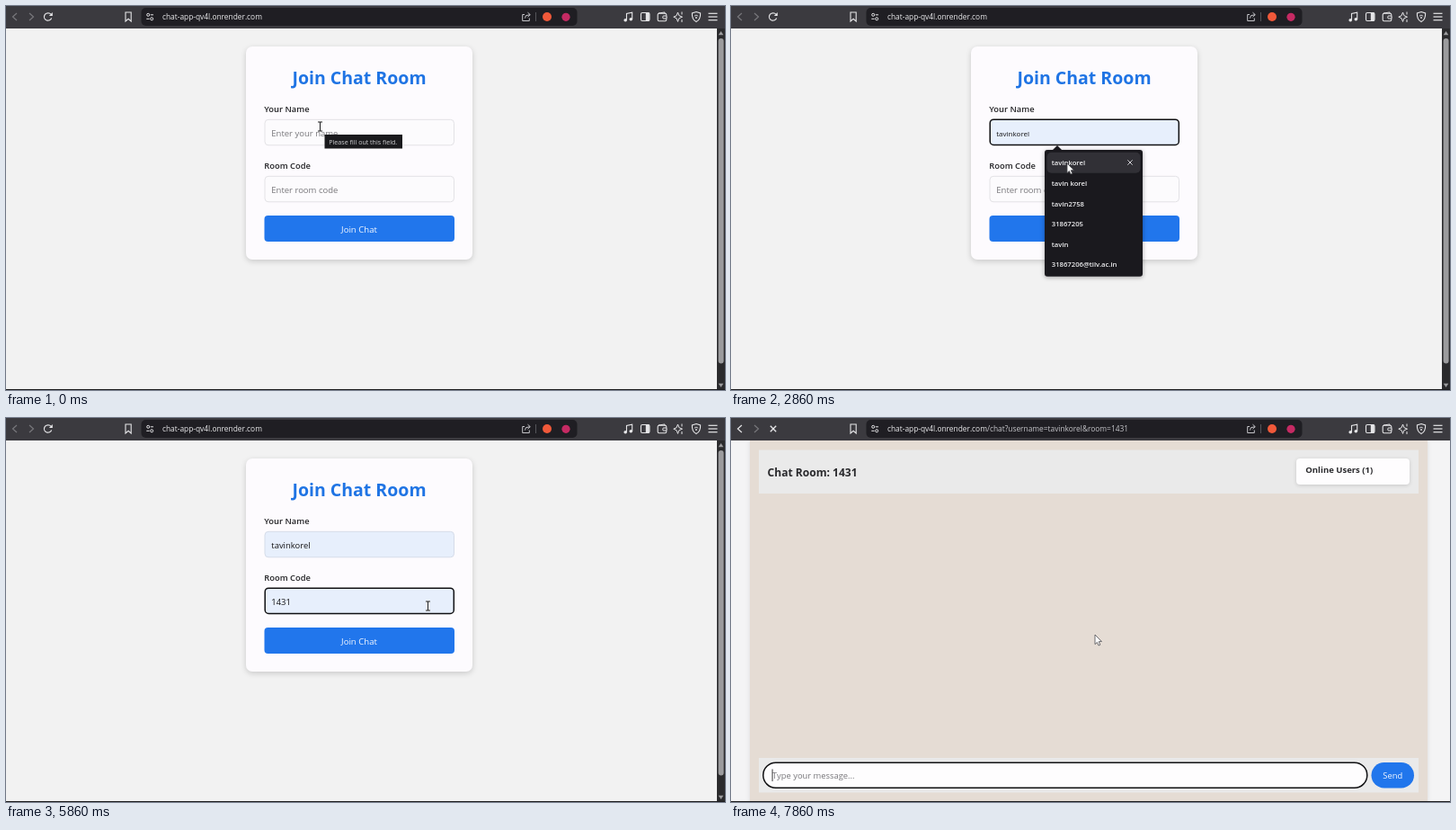
Write an HTML page with a canvas that moves like this. It is 800 px wide and 427 px high and loops after 8000 ms.

```html
<!DOCTYPE html>
<html lang="en">
<head>
<meta charset="utf-8">
<title>Join Chat Room</title>
<style>
html, body { margin: 0; width: 100%; height: 100%; overflow: hidden; background: #f2f2f2; }
canvas { display: block; width: 800px; height: 427px; }
</style>
</head>
<body>
<canvas id="stage"></canvas>
<script>
const canvas = document.getElementById('stage');
const dpr = window.devicePixelRatio || 1;
canvas.width = 800 * dpr;
canvas.height = 427 * dpr;
const ctx = canvas.getContext('2d');

const LOOP = 8000, STEP = 1000 / 7;
const FONT = '"Open Sans", "Noto Sans", sans-serif';
const BLUE = '#2176ec', BLUE_HOVER = '#1f6ede', AUTOFILL = '#e7effc';
const USER = 'tavinkorel', ROOM = '1431';
const NAMES = [USER, 'tavin korel', 'tavin2758', '31867205', 'tavin', '31867206@tilv.ac.in'];
const CODES = [ROOM, '121'];
const FIELD = { x: 287.5, w: 211.5, h: 29.5 };
const NAME_Y = 126, ROOM_Y = 189, BUTTON_Y = 233;

// Steps at which the state of the page changes
const AT = {
  nameFocus: 2, nameMenu: 3, nameHover: 19, nameFill: 21,
  roomFocus: 28, roomMenu: 29, roomHover: 33, roomFill: 35,
  submit: 48, loading: 49, navigate: 52, chat: 55
};

// Pointer path: step, x, y
const PATH = [
  [0, 349.5, 134], [2, 363.5, 151], [17, 363.5, 153], [19, 374, 175], [21, 374, 175],
  [24, 357, 167], [27, 360, 204], [29, 360, 206], [32, 374, 229], [33, 376, 235],
  [35, 376, 235], [40, 466, 208], [41, 469.5, 209], [43, 466, 212], [47, 405, 241], [56, 405, 241]
];

function pointerAt(k) {
  const i = Math.max(1, PATH.findIndex(p => p[0] >= k));
  const [k0, x0, y0] = PATH[i - 1], [k1, x1, y1] = PATH[i];
  const f = (k - k0) / (k1 - k0);
  return { x: x0 + (x1 - x0) * f, y: y0 + (y1 - y0) * f };
}

const caretOn = (k, from) => Math.floor((k - from) * STEP / 530) % 2 === 0;
const within = (v, a, b) => v >= a && v < b;

function box(x, y, w, h, r, fill, stroke, lw = 1) {
  ctx.beginPath();
  ctx.roundRect(x, y, w, h, r);
  if (fill) { ctx.fillStyle = fill; ctx.fill(); }
  if (stroke) { ctx.strokeStyle = stroke; ctx.lineWidth = lw; ctx.stroke(); }
}

function shadowed(blur, dy, alpha, draw) {
  ctx.save();
  ctx.shadowColor = `rgba(0,0,0,${alpha})`;
  ctx.shadowBlur = blur * dpr;
  ctx.shadowOffsetY = dy * dpr;
  draw();
  ctx.restore();
}

function text(str, x, y, size, color, weight = 400, align = 'left') {
  ctx.font = `${weight} ${size}px ${FONT}`;
  ctx.textAlign = align;
  ctx.fillStyle = color;
  ctx.fillText(str, x, y);
  return ctx.measureText(str).width;
}

function line(points, color, lw = 1, close = false) {
  ctx.beginPath();
  for (let i = 0; i < points.length; i += 2) ctx.lineTo(points[i], points[i + 1]);
  if (close) ctx.closePath();
  ctx.strokeStyle = color;
  ctx.lineWidth = lw;
  ctx.stroke();
}

function poly(points, fill) {
  ctx.beginPath();
  for (let i = 0; i < points.length; i += 2) ctx.lineTo(points[i], points[i + 1]);
  ctx.closePath();
  ctx.fillStyle = fill;
  ctx.fill();
}

function ring(x, y, r, color, lw = 1, from = 0, to = Math.PI * 2) {
  ctx.beginPath();
  ctx.arc(x, y, r, from, to);
  ctx.strokeStyle = color;
  ctx.lineWidth = lw;
  ctx.stroke();
}

function disc(x, y, r, color) {
  ctx.beginPath();
  ctx.arc(x, y, r, 0, Math.PI * 2);
  ctx.fillStyle = color;
  ctx.fill();
}

function cross(x, y, r, color, lw) {
  line([x - r, y - r, x + r, y + r], color, lw);
  line([x + r, y - r, x - r, y + r], color, lw);
}

function toolbar(k) {
  const ink = '#e6e6e8', dim = '#77777b';
  ctx.fillStyle = '#3b3a3f';
  ctx.fillRect(0, 0, 800, 25);
  box(150.5, 2, 485, 20, 5, '#1f1e23');

  line([12, 8, 7.5, 12, 12, 16], k >= AT.navigate ? ink : dim, 1.2);
  line([26, 8, 30.5, 12, 26, 16], dim, 1.2);
  if (k >= AT.loading) cross(47, 12, 3.2, ink, 1.3);
  else {
    ring(46.7, 12, 4.2, ink, 1.2, 0.35, 5.5);
    poly([51.8, 7, 51.8, 11, 47.8, 11], ink);
  }
  line([133, 7, 139.2, 7, 139.2, 17, 136.1, 14.3, 133, 17], ink, 1.1, true);

  ring(158.2, 9.8, 1.5, ink, 1);
  line([160.8, 9.8, 164, 9.8], ink);
  ring(162.2, 14.3, 1.5, ink, 1);
  line([156.3, 14.3, 159.6, 14.3], ink);

  const host = 'chat-app-qv4l.onrender.com';
  const w = text(host, 174, 15, 8.37, '#ececee');
  if (k >= AT.navigate) text(`/chat?username=${USER}&room=${ROOM}`, 174 + w, 15, 8.37, '#c6c6ca');

  line([577, 9.5, 574.7, 9.5, 574.7, 16.5, 582.3, 16.5, 582.3, 13.5], '#c4c4c8');
  line([577.5, 13.5, 578.5, 10.7, 583, 9.7], '#c4c4c8');
  line([580.5, 7.2, 583.3, 9.7, 580.5, 12.2], '#c4c4c8');
  line([589.5, 7, 589.5, 17], '#55555a');
  disc(602, 12, 5, '#f0593a');
  disc(623, 12.3, 4.6, '#c52a63');

  // Music note, side panel, wallet
  disc(689.2, 15.7, 1.8, ink);
  disc(695.3, 14.7, 1.8, ink);
  line([690.5, 15.7, 690.5, 8.4, 696.7, 7.2, 696.7, 14.7], ink, 1.1);
  box(706.5, 7.5, 9.5, 9, 1.5, null, ink, 1.1);
  ctx.fillStyle = ink;
  ctx.fillRect(711.8, 7.5, 4, 9);
  box(725.2, 8.3, 9.6, 8.4, 1.5, null, ink, 1.1);
  line([726, 8, 733, 7, 733, 8.5], ink);
  box(730.8, 11, 4.2, 3, 1, '#3b3a3f', ink);

  // Sparkle
  line([747.5, 7, 748.9, 10.7, 752.5, 12.2, 748.9, 13.7, 747.5, 17.4, 746.1, 13.7, 742.8, 12.2, 746.1, 10.7], ink, 1, true);
  line([752, 6.5, 752, 9.5], ink);
  line([752, 15, 752, 18], ink);

  // Shield
  ctx.beginPath();
  ctx.moveTo(768, 6.5);
  ctx.lineTo(772.6, 8);
  ctx.quadraticCurveTo(773, 15, 768, 17.6);
  ctx.quadraticCurveTo(763, 15, 763.4, 8);
  ctx.closePath();
  ctx.strokeStyle = ink;
  ctx.lineWidth = 1.1;
  ctx.stroke();
  ring(768, 13, 2.7, ink, 0.9, 3.9, 5.5);
  disc(768, 13, 0.9, ink);
  for (const y of [8.3, 12, 15.7]) line([781.5, y, 791.5, y], ink, 1.2);
}

function scrollbar() {
  ctx.fillStyle = '#2b2b2d';
  ctx.fillRect(791, 25, 9, 402);
  box(792.6, 36, 6, 361.5, 3, '#9c9c9e');
  poly([795.5, 28, 798.3, 32.3, 792.7, 32.3], '#9c9c9e');
  poly([795.5, 424, 798.3, 419.8, 792.7, 419.8], '#9c9c9e');
}

function field(y, { value, hint, focus, filled, preview, caret }) {
  const { x, w, h } = FIELD;
  const bg = filled ? AUTOFILL : '#fcfbfd';
  if (focus) box(x + 0.7, y + 0.2, w - 1.4, h - 1.2, 4, bg, '#101012', 1.5);
  else box(x + 0.5, y + 0.3, w - 1, h - 1, 4, bg, filled ? '#d5dce9' : '#e3e2e6');
  const base = y + 19;
  let tw = 0;
  if (value) tw = text(value, 295.3, preview ? base - 0.4 : base, preview ? 8 : 9.45, '#161618');
  else text(hint, 295.3, base, 9.5, '#77767a');
  if (caret) {
    ctx.fillStyle = '#222';
    ctx.fillRect(295.3 + tw, y + 8.5, 0.8, 13);
  }
}

function menu(y, w, items, hover) {
  const h = items.length * 22.65 + 4.9, bg = '#1a191e';
  shadowed(5, 1, 0.35, () => box(349, y, w, h, 3, bg));
  poly([357.5, y + 0.5, 363, y - 5, 368.5, y + 0.5], bg);
  if (hover) {
    box(351.5, y + 2.7, w - 5, 23, 5, '#313036');
    cross(349 + w - 14, y + 14, 2.7, '#cfcfd3', 1);
  }
  items.forEach((s, i) => text(s, 356.8, y + 17.2 + i * 22.65, 7.7, '#f0f0f2', 600));
}

function joinPage(k, p) {
  const nameMenu = within(k, AT.nameMenu, AT.nameFill);
  const roomMenu = within(k, AT.roomMenu, AT.roomFill);
  const nameFocus = within(k, AT.nameFocus, AT.roomFocus);
  const roomFocus = within(k, AT.roomFocus, AT.submit);

  ctx.fillStyle = '#f2f2f2';
  ctx.fillRect(0, 25, 800, 402);
  scrollbar();
  shadowed(6, 2, 0.17, () => box(267, 45, 252, 237, 7, '#fdfbfe'));
  text('Join Chat Room', 393, 87.2, 19.5, '#1f74e4', 700, 'center');
  text('Your Name', 287.3, 118.2, 9.35, '#222225', 600);
  text('Room Code', 287.3, 181.2, 9.35, '#222225', 600);

  field(NAME_Y, {
    value: k >= AT.nameHover ? USER : '',
    hint: 'Enter your name',
    focus: nameFocus,
    filled: k >= AT.nameHover,
    preview: within(k, AT.nameHover, AT.nameFill),
    caret: nameFocus && !within(k, AT.nameHover, AT.nameFill) &&
      caretOn(k, k >= AT.nameFill ? AT.nameFill : AT.nameFocus)
  });
  field(ROOM_Y, {
    value: k >= AT.roomHover ? ROOM : '',
    hint: 'Enter room code',
    focus: roomFocus,
    filled: k >= AT.roomHover,
    preview: within(k, AT.roomHover, AT.roomFill),
    caret: roomFocus && !within(k, AT.roomHover, AT.roomFill) &&
      caretOn(k, k >= AT.roomFill ? AT.roomFill : AT.roomFocus)
  });

  const onButton = !roomMenu && within(p.y, BUTTON_Y, BUTTON_Y + 29);
  box(FIELD.x, BUTTON_Y, FIELD.w, 29, 4, onButton ? BLUE_HOVER : BLUE);
  text('Join Chat', 393, 251.5, 9.6, '#f4f8ff', 400, 'center');

  if (nameMenu) menu(160, 109, NAMES, k >= AT.nameHover);
  if (roomMenu) menu(223, 99, CODES, k >= AT.roomHover);
  if (k < AT.nameFocus) {
    box(354.5, 143, 86.5, 15.5, 0, '#1a1a1d');
    text('Please fill out this field.', 359.3, 153.6, 7.1, '#d2d2d4');
  }

  const overField = within(p.y, NAME_Y, 156) || (within(p.y, ROOM_Y, 219) && !nameMenu);
  return overField && p.x > FIELD.x && p.x < 499;
}

function chatPage() {
  ctx.fillStyle = '#f4f4f5';
  ctx.fillRect(0, 25, 800, 402);
  shadowed(5, 0, 0.1, () => box(21, 25, 754, 402, 0, '#e5dcd4'));
  box(31, 35.5, 734, 48.5, 0, '#eaeaea');
  text('Chat Room: ' + ROOM, 40.6, 64.5, 12.05, '#29292c', 700);
  shadowed(4, 1, 0.15, () => box(629, 45, 126, 29, 4, '#fefdfe'));
  text('Online Users (1)', 639.3, 61.2, 9.5, '#29292c', 700);

  box(31, 378, 734, 38.5, 0, '#eaeaea');
  box(35.8, 383.2, 672, 28, 14, '#fefdfe', '#101012', 1.5);
  text('Type your message...', 46, 401.3, 9.4, '#77767a');
  ctx.fillStyle = '#222';
  ctx.fillRect(45.6, 390.5, 0.9, 13.5);
  box(712.5, 383, 47.5, 28.5, 14.2, BLUE);
  text('Send', 736.2, 401.3, 9.4, '#f4f8ff', 400, 'center');
}

function arrow({ x, y }) {
  const s = [0, 0, 0, 10.6, 2.4, 8.4, 4, 12, 5.8, 11.2, 4.2, 7.7, 7.4, 7.5];
  const pts = s.map((v, i) => v + (i % 2 ? y : x));
  poly(pts, '#fff');
  line(pts, '#4a4a4e', 0.8, true);
}

function ibeam({ x, y }) {
  const draw = (color, lw) => {
    line([x, y - 5, x, y + 5], color, lw);
    line([x - 2.5, y - 5, x + 2.5, y - 5], color, lw);
    line([x - 2.5, y + 5, x + 2.5, y + 5], color, lw);
  };
  draw('rgba(255,255,255,.8)', 2.2);
  draw('#1a1a1c', 1);
}

function render(ms) {
  const k = Math.floor((ms % LOOP + 5) / STEP) % 56;
  const p = pointerAt(k);
  ctx.setTransform(dpr, 0, 0, dpr, 0, 0);
  let overText = false;
  if (k >= AT.chat) chatPage();
  else overText = joinPage(k, p);
  toolbar(k);
  ctx.fillStyle = '#1d1d1f';
  ctx.fillRect(0, 426, 800, 1);
  (overText ? ibeam : arrow)(p);
}

let start;
function tick(now) {
  if (start === undefined) start = now;
  render(now - start);
  requestAnimationFrame(tick);
}
requestAnimationFrame(tick);
</script>
</body>
</html>
```
